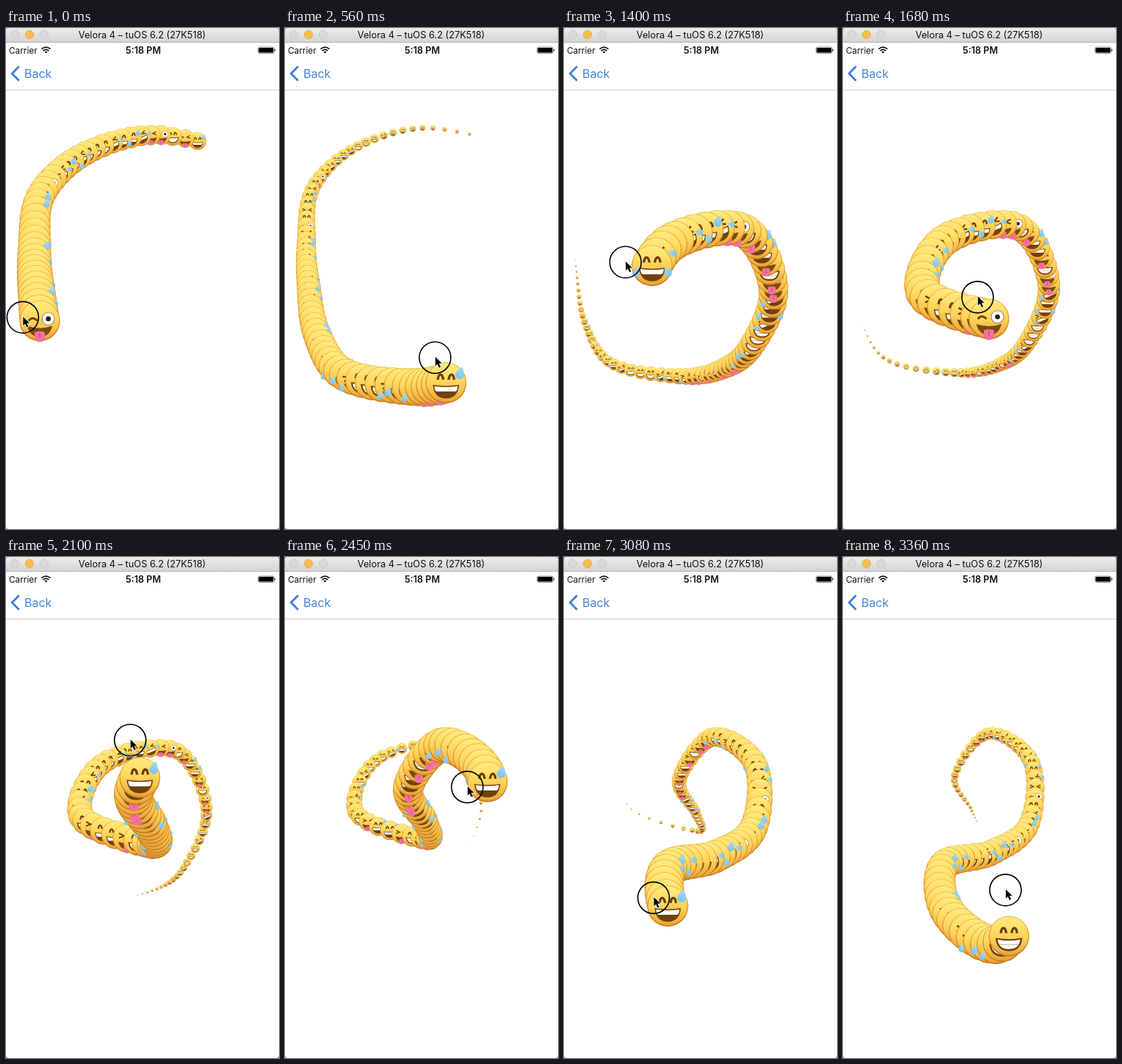
Recreate the animation shown at these times as an HTML page with a canvas. Size 372 by 682 pixels, loop 3.43 s.

```html
<!DOCTYPE html>
<html lang="en">
<head>
<meta charset="utf-8">
<title>Emoji trail</title>
<style>
html, body { margin: 0; width: 100%; height: 100%; overflow: hidden; background: #888; }
svg, canvas { position: absolute; left: 0; top: 0; width: 372px; height: 682px; }
text { font-family: Inter, Roboto, sans-serif; fill: #111; }
</style>
</head>
<body>
<svg viewBox="0 0 372 682">
  <defs>
    <linearGradient id="bar" x2="0" y2="1">
      <stop stop-color="#ededed"/><stop offset="1" stop-color="#d2d2d2"/>
    </linearGradient>
  </defs>
  <rect width="372" height="682" rx="4" fill="#fff"/>
  <path d="M0 20V4Q0 0 4 0H368Q372 0 372 4V20Z" fill="url(#bar)"/>
  <path d="M0 19.5H372" stroke="#b4b4b4"/>
  <g stroke-width=".8" fill="#d9d9d9" stroke="#c6c6c6">
    <circle cx="12" cy="9" r="5.7"/>
    <circle cx="32" cy="9" r="5.7" fill="#f9bc4f" stroke="#e5a742"/>
    <circle cx="52" cy="9" r="5.7"/>
  </g>
  <text x="185.5" y="14" font-size="12.8" text-anchor="middle">Velora 4 – tuOS 6.2 (27K518)</text>
  <text x="4" y="34.5" font-size="11.8">Carrier</text>
  <path d="M48.5 28.6Q54.5 23.6 60.5 28.6M50.6 31Q54.5 27.9 58.4 31" fill="none" stroke="#111" stroke-width="1.7"/>
  <path d="M52.4 32.4Q54.5 30.9 56.6 32.4L54.5 34.6Z" fill="#111"/>
  <text x="187" y="34.5" font-size="12.6" font-weight="600" text-anchor="middle">5:18 PM</text>
  <rect x="343.5" y="26" width="21.8" height="8.4" rx="2" fill="none" stroke="#555" stroke-width=".7"/>
  <rect x="344.4" y="26.9" width="20" height="6.6" rx="1"/>
  <path d="M366 28.6Q368 30.2 366 31.8Z"/>
  <path d="M17.8 52.3L8.2 62L17.8 71.7" fill="none" stroke="#3d7ed8" stroke-width="2.7"/>
  <text x="25" y="68" font-size="16" style="fill:#4683d9">Back</text>
  <path d="M0 84.5H372" stroke="#d0d0d2"/>
</svg>
<canvas id="stage"></canvas>
<script>
const LOOP = 3430, TICK = 70;
const ROUTE_START = -1020, KNOT = 180;
const FIRST = -930, SPAWN = 24, LIFE = 1620, SIZE = 56, LEAD = 50;

// Finger positions, one every KNOT ms, joined by a smooth curve
const route = [
  [299,155], [187,132], [90,155], [28,208], [16,279], [16,336], [24,397], [58,449], [148,463],
  [202,450], [238,416], [265,335], [220,252], [117,267], [86,337], [177,369], [173,342], [147,293],
  [190,232], [245,267], [239,349], [184,385], [116,400], [120,461], [184,500], [238,424]
];
const kinds = [
  { eyes: smile, mouth: grin, drops: [[.7, -.48, .3]], drop: .9 },
  { eyes: squint, mouth: lick },
  { eyes: smile, mouth: teeth },
  { eyes: squint, mouth: grin, drops: [[-.85, .25, .7], [.82, .1, -.9]], drop: .65, tilt: -.4 },
  { eyes: wink, mouth: lick },
  { eyes: smile, mouth: grin, drops: [[-.75, .3, .5], [.75, .3, -.5]], drop: .75 }
];
const kindOf = i => kinds[Math.round(i * (i + 1) % 21 / 3) % kinds.length];

const stage = document.getElementById("stage"), g = stage.getContext("2d");
const ratio = window.devicePixelRatio || 1;
stage.width = 372 * ratio;
stage.height = 682 * ratio;

function shade(...colors) {
  const gradient = g.createLinearGradient(0, -1, 0, 1);
  colors.forEach((color, i) => gradient.addColorStop(i / (colors.length - 1), color));
  return gradient;
}
const skin = shade("#ffeb82", "#ffe06c", "#fdd259", "#f5ba47", "#e89f35");
const rim = shade("#e9b748", "#dc9c33", "#c57f24");
const water = shade("#d2f0fd", "#8fcff4", "#55a9e2");

function pointAt(time) {
  const u = (time - ROUTE_START) / KNOT, k = Math.floor(u), f = u - k;
  const knot = n => route[Math.min(Math.max(n, 0), route.length - 1)];
  const [a, b, c, d] = [k - 1, k, k + 1, k + 2].map(knot);
  return [0, 1].map(i => b[i] + f / 2 * (c[i] - a[i]
    + f * (2 * a[i] - 5 * b[i] + 4 * c[i] - d[i] + f * (3 * (b[i] - c[i]) + d[i] - a[i]))));
}

function disc(x, y, r, color) {
  g.beginPath();
  g.arc(x, y, r, 0, 7);
  g.fillStyle = color;
  g.fill();
}
function line(path, width = .1, color = "#694009") {
  g.strokeStyle = color;
  g.lineWidth = width;
  g.stroke(new Path2D(path));
}
function fill(path, color) {
  g.fillStyle = color;
  g.fill(new Path2D(path));
}

function smile() {
  line("M-.4-.15Q-.37-.4-.27-.4T-.13-.15M.13-.15Q.17-.4.27-.4T.4-.15", .12);
}
function squint() {
  line("M-.55-.34L-.2-.15L-.57-.02M.55-.34L.2-.15L.57-.02");
}
function wink() {
  line("M-.55 0Q-.35-.25-.12 0");
  disc(.42, -.1, .33, "#a18b63");
  disc(.42, -.1, .29, "#fff");
  disc(.42, -.1, .12, "#2b1a0a");
}
function lick() {
  fill("M-.62 .25Q0 .46 .62 .25Q.48 .79 0 .79T-.62 .25Z", "#7b4a0e");
  fill("M-.25 .56Q0 .46 .25 .56V.82Q.25 1.04 0 1.04T-.25 .82Z", "#f3719f");
  line("M0 .58V.84", .05, "#d44a82");
}
function grin() {
  fill("M-.64 .1Q0 .2 .64 .1Q.58 .76 0 .76T-.64 .1Z", "#70410b");
  fill("M-.57 .16Q0 .25 .57 .16Q.55 .42 .45 .42H-.45Q-.55 .42-.57 .16Z", "#fff");
}
function teeth() {
  fill("M-.66 .08Q0 .2 .66 .08Q.6 .73 0 .73T-.66 .08Z", "#70410b");
  fill("M-.56 .16Q0 .27 .56 .16Q.5 .63 0 .63T-.56 .16Z", "#fff");
  line("M-.48 .39Q0 .46 .48 .39", .04, "#b7aa96");
}
function tear(x, y, turn, scale) {
  g.save();
  g.translate(x, y);
  g.rotate(turn);
  g.scale(scale, scale);
  fill("M0-.37Q.24-.02 .24 .1A.24 .24 0 0 1-.24 .1Q-.24-.02 0-.37Z", water);
  g.restore();
}

function emoji(kind, x, y, size) {
  const r = size / 2;
  g.save();
  g.translate(x + r, y + r);
  g.scale(r, r);
  disc(0, 0, 1, rim);
  disc(0, -.02, .95, skin);
  g.rotate(kind.tilt || 0);
  kind.eyes();
  kind.mouth();
  for (const drop of kind.drops || []) tear(...drop, kind.drop);
  g.restore();
}

function pointer(x, y) {
  g.save();
  g.translate(x, y);
  g.beginPath();
  g.arc(0, 0, 21.5, 0, 7);
  g.lineWidth = 1.6;
  g.strokeStyle = "#000";
  g.stroke();
  g.scale(.88, .88);
  const arrow = "M.5-1V13L3.7 10L6.2 15.6L8.7 14.5L6.2 9H10.5Z";
  line(arrow, 1.6, "#fff");
  fill(arrow, "#000");
  g.restore();
}

function draw(now) {
  const time = Math.floor(now % LOOP / TICK) * TICK;
  g.setTransform(ratio, 0, 0, ratio, 0, 0);
  g.clearRect(0, 0, 372, 682);
  // Each face stays pinned by its top left corner while it shrinks
  for (let i = 0, born = FIRST; born <= time; born = FIRST + SPAWN * ++i) {
    const size = SIZE * (1 - (time - born) / LIFE);
    if (size > .4) emoji(kindOf(i), ...pointAt(born), size);
  }
  pointer(...pointAt(time + LEAD));
  requestAnimationFrame(draw);
}
requestAnimationFrame(draw);
</script>
</body>
</html>
```
